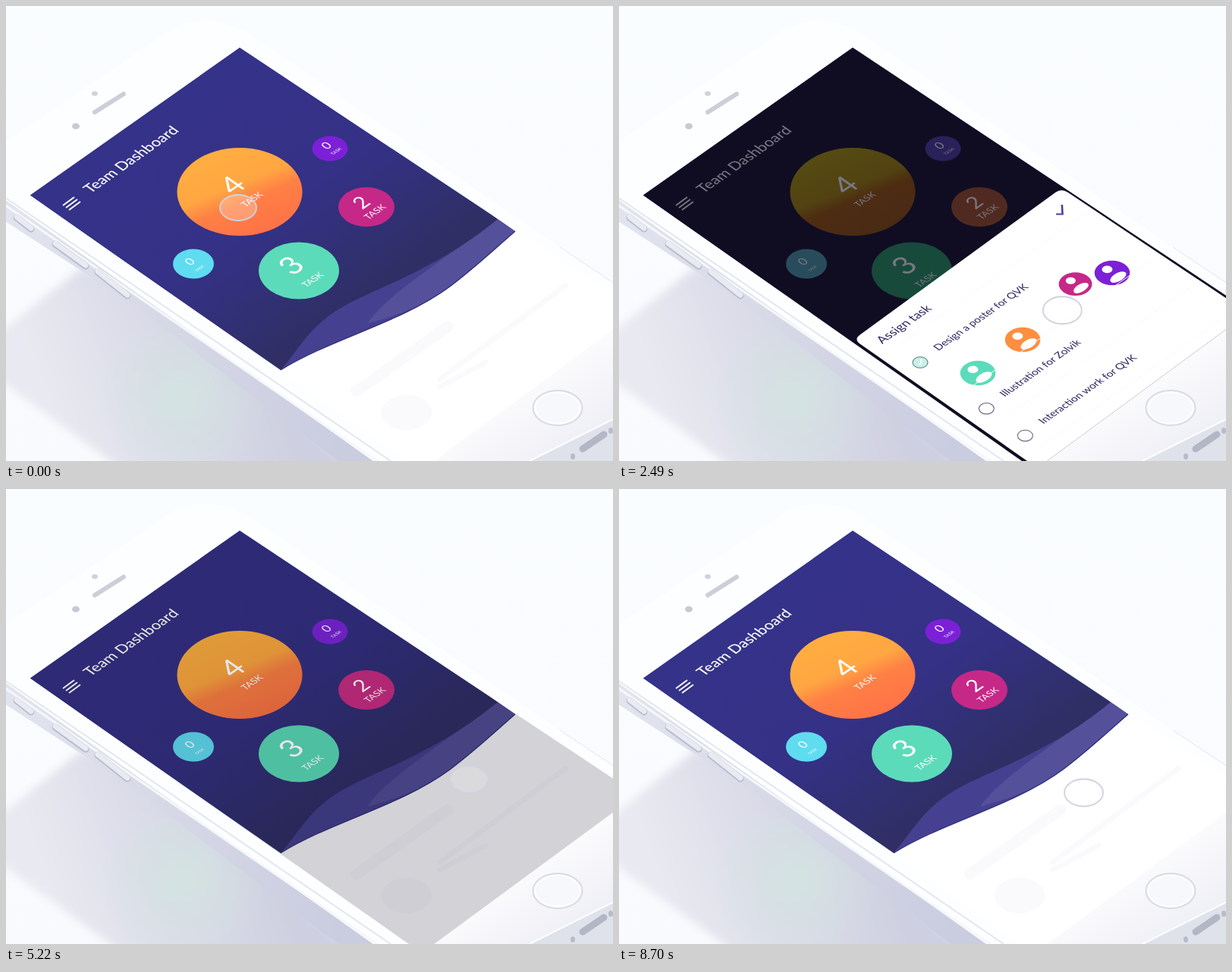
Write an HTML page that moves like this. It is 800x600 px and loops after 8.73 s.

```html
<!DOCTYPE html>
<html lang="en">
<head>
<meta charset="utf-8">
<title>Team Dashboard</title>
<style>
html, body { margin: 0; width: 100%; height: 100%; overflow: hidden; background: #fafcfe; }
svg { display: block; width: 800px; height: 600px; font-family: Lato, "Open Sans", sans-serif; }
.mid { text-anchor: middle; }
.row { font-size: 15.8px; fill: #2b2560; }
</style>
</head>
<body>
<svg id="stage" viewBox="0 0 800 600">
  <defs>
    <linearGradient id="page" x2="0" y2="1">
      <stop stop-color="#fafdff"/><stop offset="1" stop-color="#f9fafd"/>
    </linearGradient>
    <linearGradient id="navy" gradientUnits="userSpaceOnUse" x1="260" y1="130" x2="480" y2="445">
      <stop stop-color="#353289"/><stop offset=".45" stop-color="#343186"/><stop offset=".85" stop-color="#2f2f66"/>
    </linearGradient>
    <linearGradient id="orange" x1=".25" y1=".07" x2=".75" y2=".93">
      <stop stop-color="#ffae40"/><stop offset=".42" stop-color="#ffa642"/>
      <stop offset=".62" stop-color="#ff8045"/><stop offset="1" stop-color="#ff7247"/>
    </linearGradient>
    <linearGradient id="umber" x1=".25" y1=".07" x2=".75" y2=".93">
      <stop stop-color="#554b12"/><stop offset=".45" stop-color="#524212"/>
      <stop offset=".6" stop-color="#4d2c12"/><stop offset="1" stop-color="#492a14"/>
    </linearGradient>
    <linearGradient id="shade" gradientUnits="userSpaceOnUse" x1="60" y1="540" x2="330" y2="440">
      <stop stop-color="#e9e9f1"/><stop offset="1" stop-color="#cecfe0"/>
    </linearGradient>
    <radialGradient id="tint" gradientUnits="userSpaceOnUse" cx="235" cy="515" r="115">
      <stop stop-color="#d3e3e1"/><stop offset="1" stop-color="#d3e3e1" stop-opacity="0"/>
    </radialGradient>
    <linearGradient id="side" gradientUnits="userSpaceOnUse" x1="0" y1="260" x2="430" y2="590">
      <stop stop-color="#e2e4ee"/><stop offset=".5" stop-color="#d6d8e6"/><stop offset="1" stop-color="#cacde0"/>
    </linearGradient>
    <linearGradient id="chin" gradientUnits="userSpaceOnUse" x1="690" y1="500" x2="750" y2="590">
      <stop stop-color="#fbfbfd"/><stop offset="1" stop-color="#eeeff5"/>
    </linearGradient>
    <filter id="soft"><feGaussianBlur stdDeviation="6"/></filter>
    <clipPath id="screen"><path d="M32 249.500 308 55 832 403 548 612Z"/></clipPath>
  </defs>

  <rect width="800" height="600" fill="url(#page)"/>
  <g filter="url(#soft)">
    <path d="M-20 440 100 345 170 360 470 620H165L-20 485Z" fill="url(#shade)"/>
    <path d="M110 430H330L400 620H110Z" fill="url(#tint)"/>
  </g>

  <!-- phone body -->
  <path d="M-10 240 V278 L165 392 440 602H550Z" fill="url(#side)"/>
  <path d="M-20 192 215 33Q262 5 318 35L730 318 840 392V620H512L-20 242Z" fill="#fdfeff"/>
  <path d="M-2 252 507 600" stroke="#e4e6ef" stroke-width="2"/>
  <path d="M-2 262 492 602" stroke="#f6f7fb" stroke-width="3"/>
  <path d="M730 318 802 366" stroke="#e3e5ec"/>
  <g id="keys" stroke-linecap="round"></g>
  <path d="M117 140 155 116" stroke="#cdced9" stroke-width="6" stroke-linecap="round"/>
  <ellipse cx="117" cy="115.500" rx="4" ry="3" fill="#d0d1db"/>
  <ellipse cx="92" cy="158.500" rx="5" ry="4" fill="#c8c9d4"/>
  <path d="M548 604 802 424V602H548Z" fill="url(#chin)"/>
  <path d="M686 602 802 545V602Z" fill="#e0e2eb"/>
  <path d="M690 600 802 544" stroke="#fff" stroke-width="2"/>
  <path d="M760 584 788 565" stroke="#b3b6c5" stroke-width="9" stroke-linecap="round"/>
  <ellipse cx="747" cy="594" rx="3" ry="4" fill="#b9bbc9"/>
  <ellipse cx="797" cy="560" rx="3" ry="4" fill="#b9bbc9"/>
  <ellipse cx="727" cy="530" rx="32.500" ry="23" fill="#f7f8fb" stroke="#d9dbe4" stroke-width="2"/>
  <ellipse cx="727" cy="530" rx="29.500" ry="20.500" fill="none" stroke="#fff" stroke-width="1.500"/>

  <g clip-path="url(#screen)">
    <rect width="840" height="620" fill="#fff"/>
    <g stroke="#fafafd" fill="#fafafd" stroke-linecap="round">
      <path d="M462 508 582 423" stroke-width="15"/>
      <path d="M572 492 738 368M572 502 632 470" stroke-width="7"/>
      <ellipse cx="528" cy="536" rx="33" ry="23"/>
    </g>
    <path d="M20 242 308 40 671 297C640 324 618 345 585 370C520 418 430 438 362 480Z" fill="#454190"/>
    <path d="M476 419 C500 385 540 360 648 281L671 297C640 324 618 345 585 370C550 396 515 408 476 419Z" fill="#54509a"/>
    <path d="M20 242 308 40 648 281C610 312 580 330 545 348C500 372 450 388 420 413C395 433 380 460 362 480Z" fill="url(#navy)"/>
    <path d="M671 297C640 324 618 345 585 370C520 418 430 438 362 480" fill="none" stroke="#312f7c" stroke-width="1.300"/>
    <g id="bright"></g>
    <g id="dim"></g>
    <g id="sheet">
      <path d="M319 446.500Q309 440 317 434L575 246Q583 240 592 246L840 412 548 612 538 600Z" fill="#fff"/>
      <g id="list"></g>
    </g>
  </g>
  <ellipse id="cursor" stroke="#d0d1e0" stroke-width="1.800"/>
</svg>

<script>
const LOOP = 8730;
const $ = id => document.getElementById(id);

// Places the isometric screen plane at a stage point.
const plane = (x, y, s = 1) =>
  `matrix(${.7071 * s} ${-.497 * s} ${.7071 * s} ${.497 * s} ${x} ${y})`;
const label = (x, y, size, text, attrs = '') =>
  `<text class="mid" transform="${plane(x, y)}" y="${size * .36}" font-size="${size}" ${attrs}>${text}</text>`;

// Ellipse, fills, digit with its place and size, caption with its place and size.
const bubbles = [
  { id: 'purple', at: [427, 188, 23.5, 16.5], fill: '#7c20d8', dim: '#292159', n: 0, digit: [422, 184, 18], cap: [435, 191.500, 7] },
  { id: 'pink', at: [475, 265, 37, 26], fill: '#c62887', dim: '#502a20', n: 2, digit: [468, 259, 31], cap: [486, 271.500, 14] },
  { id: 'cyan', at: [247, 340, 27, 19.5], fill: '#5fdcf0', dim: '#294c5c', n: 0, digit: [242, 337, 18], cap: [255, 346, 6] },
  { id: 'green', at: [386, 349, 53, 37.5], fill: '#5cdbba', dim: '#174a3a', n: 3, digit: [375.5, 342, 45], cap: [404, 361, 14] },
  { id: 'big', at: [308, 245, 82.5, 58], fill: 'url(#orange)', dim: 'url(#umber)', n: 4, digit: [298, 236, 45], cap: [324, 255, 14] }
];

const disc = (b, fill, id) => {
  const [x, y, rx, ry] = b.at;
  return `<g transform="translate(${x} ${y})"><ellipse ${id} rx="${rx}" ry="${ry}" fill="${fill}"/></g>`;
};
const captions = live => bubbles.map(b =>
  label(...b.digit, b.n, live ? `id="${b.id}N"` : '') + label(...b.cap, 'TASK')).join('');
const header = ink => `<g transform="${plane(111.5, 247.5)}"><text font-size="22.600" font-weight="500" fill="${ink}">Team Dashboard</text></g>
  <path d="M75 263 90 252M79 266 94 255M83 269 98 258" stroke="${ink}" stroke-width="2"/>`;
const ball = id => `<g id="${id}"><ellipse rx="37" ry="26" fill="url(#orange)"/>${label(-13, -5, 27, 1, 'fill="#fff"')}</g>`;

const small = bubbles.slice(0, 4), big = bubbles[4];
$('bright').innerHTML = header('#fff') +
  small.map(b => disc(b, b.fill, `id="${b.id}"`)).join('') +
  ball('ballA') + ball('ballB') + disc(big, big.fill, 'id="big"') +
  `<g fill="#fff">${captions(true)}</g>`;
$('dim').innerHTML = '<rect width="840" height="620" fill="#100d22"/>' + header('#75727f') +
  bubbles.map(b => disc(b, b.dim, '')).join('') + `<g fill="#797683">${captions(false)}</g>`;

$('keys').innerHTML = [[14, 279, 33, 294], [65, 314, 105, 343], [121, 351, 160, 382]].map(([a, b, c, d]) =>
  `<path d="M${a} ${b} ${c} ${d}" stroke="#b9bccd" stroke-width="9"/>
   <path d="M${a} ${b - 1} ${c} ${d - 1}" stroke="#e9ebf3" stroke-width="7"/>`).join('');

const faces = { green: '#5cdbba', orange: '#ff8e3f', pink: '#c62887', cyan: '#5fdcf0', purple: '#7c20d8' };
const face = name => `<circle r="25" fill="${faces[name]}"/><circle cy="-10" r="7.500" fill="#fff"/>
  <ellipse cy="12" rx="14" ry="7.500" fill="#fff"/>`;

const rows = [
  { text: 'Design a poster for QVK', team: ['green', 'orange', 'pink', 'purple'], open: 1750, pick: 2380 },
  { text: 'Illustration for Zolvik', team: ['green', 'orange', 'cyan', 'purple'], open: 2980, pick: 3640 },
  { text: 'Interaction work for QVK' },
  { text: 'Research work for Ovlen' }
];
const PICKED = 2;

$('list').innerHTML = `<text transform="${plane(347, 446)}" font-size="19" fill="#2b2560">Assign task</text>
  <path transform="${plane(581, 270)}" d="M-8 1-2 7 10-6" fill="none" stroke="#4a3fa8" stroke-width="2.600"/>` +
  rows.map((r, i) => `<g id="row${i}">
    <path d="M-28-23 222-199" stroke="#fafafc"/>
    <ellipse rx="10" ry="7.300" fill="#fff" stroke="#6a6888" stroke-width="1.100"/>
    <g id="tick${i}"><ellipse rx="10.500" ry="7.700" fill="#4fceac"/>
      <path transform="${plane(0, 0)}" d="M-4 0-1 3 5-4" fill="none" stroke="#fff" stroke-width="1.600"/></g>
    <text class="row" transform="${plane(24, -15)}">${r.text}</text>
    ${(r.team || []).map((name, k) => `<g id="face${i}${k}">${face(name)}</g>`).join('')}
  </g>`).join('');

const ease = p => p * p * (3 - 2 * p);
const ramp = (t, a, b) => ease(Math.min(1, Math.max(0, (t - a) / (b - a))));
const mix = (a, b, p) => a + (b - a) * p;

// Eased value along a list of [time, value...] points.
function track(t, points) {
  const next = points.findIndex(p => p[0] > t);
  if (next < 0) return points[points.length - 1].slice(1);
  if (next === 0) return points[0].slice(1);
  const from = points[next - 1], to = points[next];
  const p = ramp(t, from[0], to[0]);
  return from.slice(1).map((v, i) => mix(v, to[i + 1], p));
}

const path = [
  [250, 306, 266], [1250, 476, 416], [1750, 476, 416], [2250, 590, 396], [2420, 590, 396],
  [2800, 528, 453], [3290, 528, 453], [3550, 641, 432], [3720, 641, 432], [4350, 597, 279],
  [4650, 597, 279], [5400, 612.5, 400.5]
];
const taps = [60, 1660, 2330, 2920, 3620, 4540];

const place = (id, x, y) => $(id).setAttribute('transform', `translate(${x} ${y})`);
const scale = (id, s) => $(id).setAttribute('transform', `scale(${s})`);
const fade = (id, o) => $(id).setAttribute('opacity', o);

function drawList(t) {
  let shift = 0;
  rows.forEach((r, i) => {
    place('row' + i, 397 + 51 * i + 39 * shift, 470 + 35.7 * i + 27 * shift);
    const done = r.pick ? ramp(t, r.pick, r.pick + 300) : 0;
    fade('tick' + i, done);
    if (!r.team) return;
    const open = ramp(t, r.open, r.open + 300) - ramp(t, r.pick + 60, r.pick + 380);
    r.team.forEach((name, k) => {
      const x = 76 + 59 * k, y = 14 - 44 * k;
      const el = $(`face${i}${k}`);
      if (k === PICKED && done) {
        el.setAttribute('transform', plane(mix(x, 228, done), mix(y, -169, done), mix(1, .6, done)));
      } else {
        el.setAttribute('transform', plane(x, y, Math.max(open, .001)));
      }
      el.setAttribute('visibility', open > .01 || (k === PICKED && done) ? 'visible' : 'hidden');
    });
    shift += open;
  });
}

function drawBall(id, t, start, end, x, y, s) {
  const p = ramp(t, start, end);
  $(id).setAttribute('transform',
    `translate(${mix(308, x, p)} ${mix(245, y, p)}) scale(${mix(.95, s, p)})`);
  fade(id, t < start ? 0 : 1 - ramp(t, end + 40, end + 220));
}

function drawBubbles(t) {
  const reset = 1 - ramp(t, 8250, 8600);
  const grown = (a, b) => ramp(t, a, b) * reset;
  scale('big', 1 - .04 * grown(6150, 6450) - .058 * grown(7050, 7330));
  scale('pink', 1 + .2 * grown(6180, 6480));
  scale('cyan', 1 + .2 * grown(7850, 8100));
  drawBall('ballA', t, 5600, 6090, 474, 265, .99);
  drawBall('ballB', t, 7390, 7800, 247, 340, .72);
  const live = t < 8400;
  $('bigN').textContent = !live || t < 5750 ? 4 : t < 7150 ? 3 : 2;
  $('pinkN').textContent = live && t > 6250 ? 3 : 2;
  $('cyanN').textContent = live && t > 7850 ? 1 : 0;
}

function draw(now) {
  const t = now % LOOP;
  fade('dim', ramp(t, 200, 750) - ramp(t, 4750, 5400));
  const away = 1 - ramp(t, 250, 880) + ramp(t, 4650, 5300);
  place('sheet', 360 * away, 245 * away);
  drawList(t);
  drawBubbles(t);

  const [x, y] = track(t, path);
  const press = Math.max(...taps.map(at => Math.max(0, 1 - Math.abs(t - at) / 120)));
  const c = $('cursor');
  place('cursor', x, y);
  c.setAttribute('rx', 25.500 - 3 * press);
  c.setAttribute('ry', 18 - 2 * press);
  c.setAttribute('fill', `rgba(255,255,255,${.15 + .2 * press})`);
  requestAnimationFrame(draw);
}
requestAnimationFrame(draw);
</script>
</body>
</html>
```
